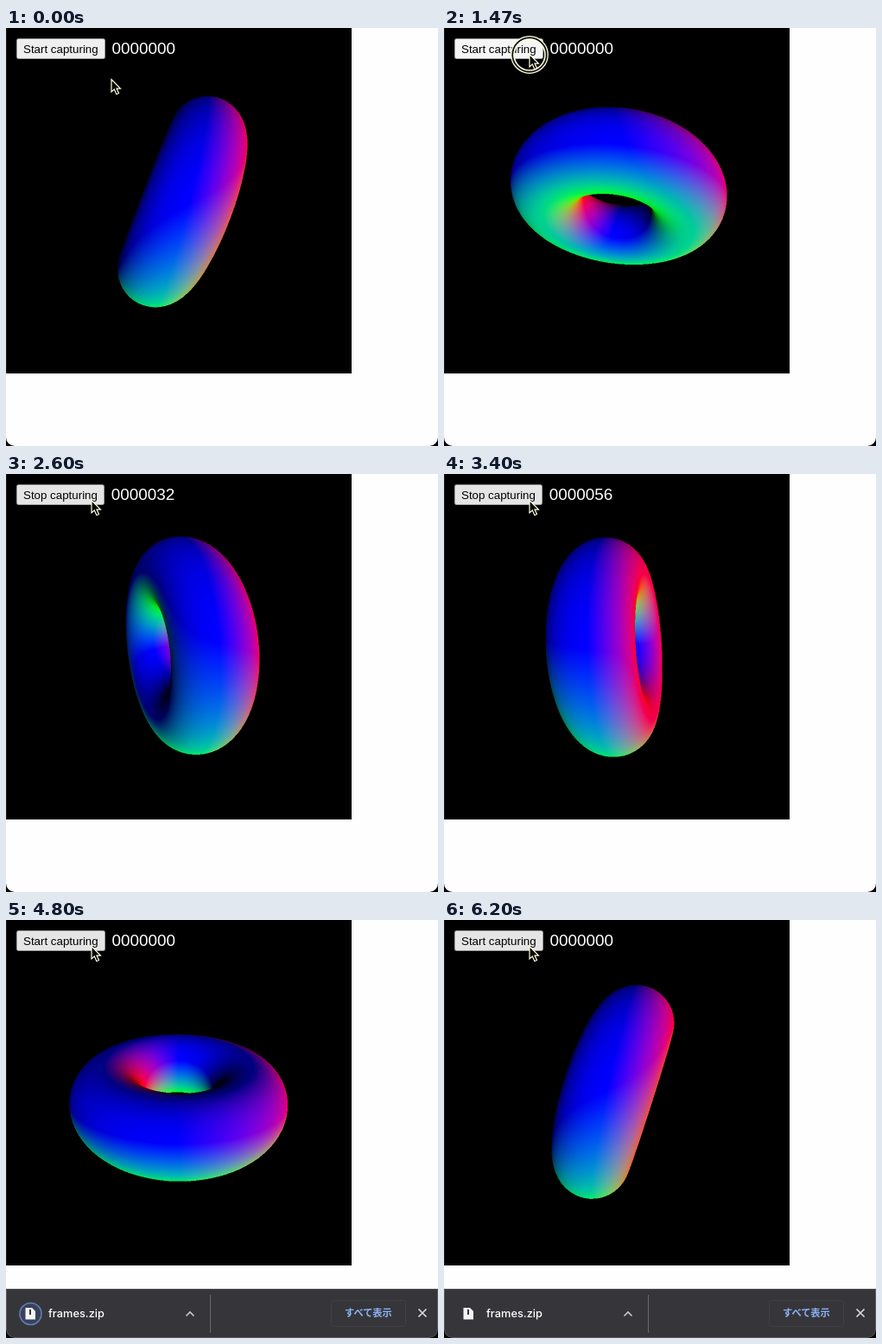
Recreate the animation shown at these times as an HTML page with a canvas. Size 500 px wide and 484 px high, loop 6270 ms.

```html
<!DOCTYPE html>
<html lang="ja">
<head>
<meta charset="utf-8">
<title>Torus capture</title>
<style>
  html, body { margin: 0; width: 100%; height: 100%; overflow: hidden; background: #fefefe; }
  canvas, svg { position: absolute; left: 0; top: 0; }
  canvas { width: 400px; height: 400px; }
  svg { width: 500px; height: 484px; }
  text { font-family: "Liberation Sans", Arial, sans-serif; white-space: pre; }
</style>
</head>
<body>
<canvas id="view" width="800" height="800"></canvas>
<svg viewBox="0 0 500 484" fill="none">
  <path d="M.5 0V400" stroke="#1c1c1c"/>

  <rect id="button" x="12.5" y="12.5" width="102" height="23" rx="2" stroke="#999"/>
  <text id="label" x="20" y="28.8" font-size="13.33" fill="#000"></text>
  <text id="count" x="122.5" y="29.8" font-size="18.9" fill="#fff"></text>

  <g id="shelf">
    <rect y="427" width="500" height="57" fill="#36363a"/>
    <path d="M0 427.5H500" stroke="#505054"/>
    <path d="M.5 428V474A9.5 9.5 0 0 0 10 483.5H490A9.5 9.5 0 0 0 499.5 474V428" stroke="#5a5a5e"/>
    <circle id="pulse" cx="28.5" cy="456" r="12.5" fill="#39425a" stroke="#5f7fb4" stroke-width="1.6"/>
    <path d="M22.5 449H30L34 453V462.5H22.5Z" fill="#f4f4f4"/>
    <path d="M28 451V457" stroke="#36363a" stroke-width="2"/>
    <text x="49" y="460.3" font-size="12.8" font-weight="500" fill="#fff" style="font-family: Inter, sans-serif">frames.zip</text>
    <path d="M208.5 458.5L213 454L217.5 458.5" stroke="#c8c8c8" stroke-width="1.6"/>
    <path d="M236.5 434V478" stroke="#6a6a6a"/>
    <rect x="376.5" y="440.5" width="86" height="30" rx="3" stroke="#404044"/>
    <text x="392" y="459" font-size="11.2" font-weight="700" fill="#8ab4f8" style="font-family: 'Noto Sans CJK JP', 'Noto Sans CJK', sans-serif">すべて表示</text>
    <path d="M477.5 450.5L486.5 459.5M486.5 450.5L477.5 459.5" stroke="#d8d8d8" stroke-width="1.7"/>
  </g>

  <path d="M0 474A10 10 0 0 0 10 484H0ZM500 474A10 10 0 0 1 490 484H500Z" fill="#000"/>

  <g id="ring">
    <circle cx="99" cy="31" r="19.8" stroke="#111" stroke-width="2.6"/>
    <circle cx="99" cy="31" r="21.3" stroke="#ffffe0" stroke-width="1.3"/>
    <circle cx="99" cy="31" r="18" stroke="#ffffe0" stroke-width="1.6"/>
  </g>
  <path id="cursor" d="M0 0V14.5L3.3 11.6L5.9 17.2L8.5 16L6 10.6H10.4Z" fill="#000" stroke="#ffffe0" stroke-width="1.2"/>
</svg>
<script>
const LOOP = 6270, LAST_STEP = 93;
const SIZE = 800, HALF = SIZE / 2, EYE = 200 / Math.tan(Math.PI / 6);
const RADIUS = 80, TUBE = 40, AROUND = 96, SIDES = 48;

const $ = id => document.getElementById(id);
const ctx = $('view').getContext('2d');
const image = ctx.createImageData(SIZE, SIZE);
const pixels = new Uint32Array(image.data.buffer);
const depth = new Float32Array(SIZE * SIZE);

const clamp = x => Math.max(0, Math.min(1, x));
const ease = x => x * x * (3 - 2 * x);
const between = (x, a, b) => x >= a && x <= b;

// Vertex: screen x, y, inverse depth q, and the view-space normal
function vertex(i, j, spin) {
  const phi = 2 * Math.PI * i / SIDES, theta = 2 * Math.PI * j / AROUND;
  const c = Math.cos(theta), s = Math.sin(theta), out = Math.cos(phi), up = Math.sin(phi);
  const r = RADIUS + TUBE * out;
  const [x, y, z] = spin(r * c, r * s, TUBE * up);
  const q = 1 / (EYE - z), zoom = EYE * q * SIZE / 400;
  return { x: HALF + x * zoom, y: HALF + y * zoom, q, n: spin(out * c, out * s, up) };
}

function triangle(a, b, c) {
  const area = (b.x - a.x) * (c.y - a.y) - (b.y - a.y) * (c.x - a.x);
  if (!area) return;
  const x0 = Math.floor(Math.min(a.x, b.x, c.x)), x1 = Math.max(a.x, b.x, c.x);
  const y0 = Math.floor(Math.min(a.y, b.y, c.y)), y1 = Math.max(a.y, b.y, c.y);
  for (let y = y0; y <= y1; y++) {
    for (let x = x0; x <= x1; x++) {
      const px = x + .5, py = y + .5;
      let u = ((b.x - px) * (c.y - py) - (b.y - py) * (c.x - px)) / area;
      let v = ((c.x - px) * (a.y - py) - (c.y - py) * (a.x - px)) / area;
      let w = 1 - u - v;
      if (u < 0 || v < 0 || w < 0) continue;
      u *= a.q; v *= b.q; w *= c.q;
      const q = u + v + w, at = y * SIZE + x;
      if (q <= depth[at]) continue;
      depth[at] = q;
      for (let k = 0; k < 3; k++)
        image.data[at * 4 + k] = 255 * (u * a.n[k] + v * b.n[k] + w * c.n[k]) / q;
    }
  }
}

function drawTorus(tick) {
  const ax = tick * .02, ay = tick * .03;
  const cx = Math.cos(ax), sx = Math.sin(ax), cy = Math.cos(ay), sy = Math.sin(ay);
  const spin = (x, y, z) => {
    const d = z * cy - x * sy;
    return [x * cy + z * sy, y * cx - d * sx, y * sx + d * cx];
  };
  pixels.fill(0xff000000);
  depth.fill(0);
  const grid = [];
  for (let i = 0; i <= SIDES; i++) {
    grid.push([]);
    for (let j = 0; j <= AROUND; j++) grid[i].push(vertex(i, j, spin));
  }
  for (let i = 0; i < SIDES; i++) {
    for (let j = 0; j < AROUND; j++) {
      const a = grid[i][j], b = grid[i + 1][j + 1];
      triangle(a, grid[i + 1][j], b);
      triangle(a, b, grid[i][j + 1]);
    }
  }
  ctx.putImageData(image, 0, 0);
}

function drawPage(step) {
  const capturing = between(step, 23, 63);
  const pressed = between(step, 21, 22) || between(step, 62, 63);
  const move = ease(clamp(step / 9));
  const tipX = 122 - 23 * move, tipY = 59.5 - 29 * move;
  const hover = tipX < 115 && tipY < 36;

  $('button').setAttribute('width', capturing ? 101 : 102);
  $('button').setAttribute('fill', pressed ? '#f5f5f5' : hover ? '#e5e5e5' : '#efefef');
  $('label').textContent = capturing ? 'Stop capturing' : 'Start capturing';
  $('count').textContent = String(capturing ? 2 * (step - 23) : 0).padStart(7, '0');
  $('count').setAttribute('x', capturing ? 121.7 : 122.5);
  $('cursor').setAttribute('transform', `translate(${tipX} ${tipY})`);
  $('ring').style.display = between(step, 21, 23) || between(step, 62, 64) ? '' : 'none';
  $('shelf').setAttribute('transform', `translate(0 ${57 * (1 - clamp((step - 66) / 3))})`);
  $('pulse').setAttribute('opacity', clamp((92 - step) / 8));
}

let shown = -1;
function frame() {
  const time = performance.now() % LOOP;
  const step = Math.min(LAST_STEP, Math.floor(time * .015 + .06));
  if (step !== shown) {
    shown = step;
    drawTorus(65 + 2 * step);
    drawPage(step);
  }
  requestAnimationFrame(frame);
}
frame();
</script>
</body>
</html>
```
